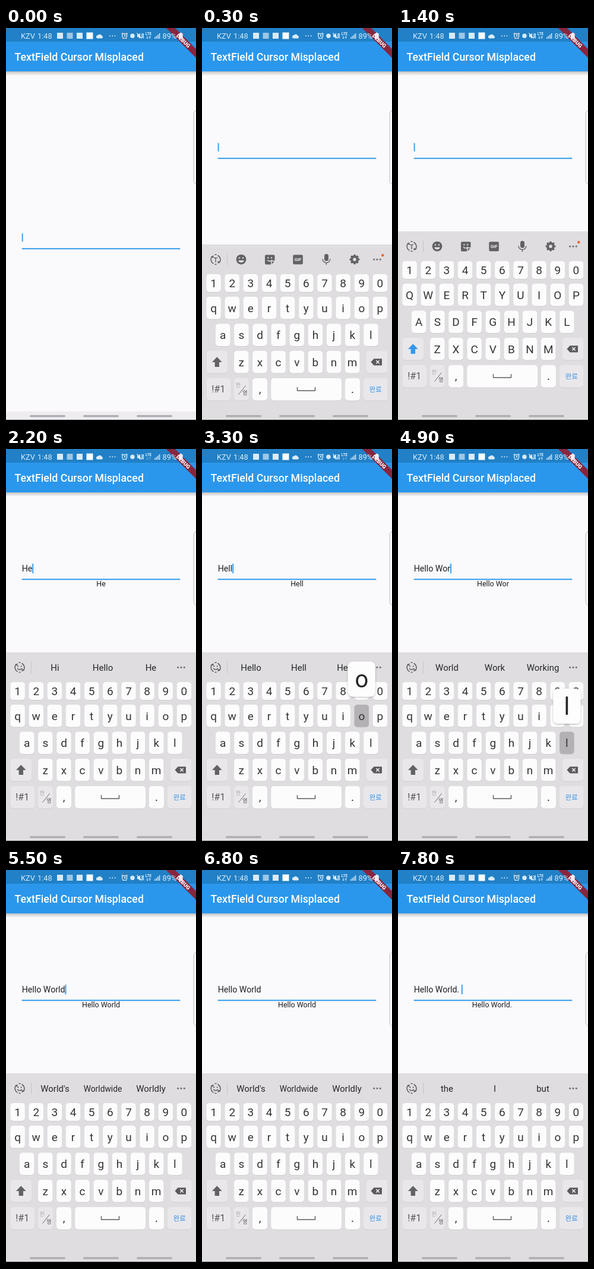
Write an HTML page that moves like this. It is 320 by 661 pixels and loops after 8 s.

```html
<!DOCTYPE html>
<html lang="en">
<head>
<meta charset="utf-8">
<title>TextField cursor</title>
<style>
  html, body { margin: 0; width: 100%; height: 100%; overflow: hidden; background: #faf9fb; }
  svg { display: block; width: 100vw; height: 100vh; font-family: Roboto, sans-serif; }
  text { white-space: pre; }
  .mid { text-anchor: middle; }
  .ko { font-family: "Noto Sans CJK KR", "Noto Sans CJK", sans-serif; }
  .line { fill: none; stroke: #5d5c5f; stroke-width: 1.4; }
  .icon { fill: #626164; }
</style>
</head>
<body>
<svg id="stage" viewBox="0 0 320 661" xmlns="http://www.w3.org/2000/svg"></svg>
<script>
const LOOP = 8000;
const BLUE = '#2b97ec', KEY = '#fdfcfd', SOFT = '#e9e7ea', DOWN = '#b3b1b4', PALE = '#d9ebf8';

const rect = (x, y, w, h, fill, r = 0, more = '') =>
  `<rect x="${x}" y="${y}" width="${w}" height="${h}" rx="${r}" fill="${fill}" ${more}/>`;
const dot = (x, y, r, fill) => `<circle cx="${x}" cy="${y}" r="${r}" fill="${fill}"/>`;
const text = (x, y, size, fill, str, more = '') =>
  `<text x="${x}" y="${y}" font-size="${size}" fill="${fill}" ${more}>${str}</text>`;
const path = (d, more = 'class="line"') => `<path d="${d}" ${more}/>`;
const mid = 'class="mid"';

function appBar() {
  return rect(0, 0, 320, 80, 'url(#shade)') + rect(0, 0, 320, 73, BLUE) + rect(0, 0, 320, 23, '#2180c6') +
    text(14.5, 55, 17.8, '#fff', 'TextField Cursor Misplaced', 'font-weight="500"') +
    `<g transform="translate(320 0) rotate(45)">${rect(-50, 24.9, 100, 10.7, '#87263f')}` +
    text(0, 33.5, 9, '#fff', 'DEBUG', 'class="mid" font-weight="900"') + '</g>';
}

function statusBar() {
  const bars = [0, 1, 2, 3].map(i =>
    rect(250 + i * 2.6, 15.5 - i * 2.2, 1.5, 2.5 + i * 2.2, PALE)).join('');
  const stroke = `fill="none" stroke="${PALE}" stroke-width="1.3"`;
  return text(25, 17.6, 12.8, PALE, 'KZV') + text(53, 17.6, 12.8, PALE, '1:48') +
    rect(86, 8, 10, 10, PALE) + rect(102.5, 8, 10, 10, '#9cc7e6') +
    rect(119, 8, 10, 10, PALE) + rect(135.5, 7.5, 11, 11, '#fafcfd') +
    path('M154.5 17.5a2.7 2.7 0 0 1 .3-5.4a3.8 3.8 0 0 1 6.6 1a2.3 2.3 0 0 1 0 4.4z', `fill="${PALE}"`) +
    [175, 179.3, 183.6].map(x => dot(x, 13.3, 1, PALE)).join('') +
    path('M195.7 13.3a4 4 0 1 0 8 0a4 4 0 1 0-8 0M199.7 10.8v2.7h2M194.6 10.2l2.4-2M204.8 10.2l-2.4-2M196.5 18l1-1.3M203 18l-1-1.3', stroke) +
    dot(213, 13.2, 3.7, PALE) +
    path('M221 11.2h2l3-2.6v9.4l-3-2.7h-2z', `fill="${PALE}"`) +
    path('M220.5 8.5l8 9M228.5 9l1.3 2-1.3 2 1.3 2-1.3 2M231.3 9v8.5', stroke) +
    text(240, 12.4, 6.4, PALE, 'LTE', 'class="mid" font-weight="700"') +
    path('M238 13.6v4.2m-1.4-1.5l1.4 1.6 1.4-1.6M242.3 18.2v-4.2m-1.4 1.5l1.4-1.6 1.4 1.6', `id="data" fill="none" stroke="${PALE}"`) +
    bars + text(263.5, 17.6, 12.8, PALE, '89%') +
    rect(291, 9, 6.8, 9.6, '#f2e9f0', 1) + rect(293, 7.8, 2.8, 1.6, '#f2e9f0');
}

const swirl = path('M19.5 374.3a8 8 0 0 1-2.6-12.2M26.5 360.5a8 8 0 0 1 2.7 12.2') +
  path('M14.8 362.8l4.6-2.3v4.6zM31.2 372l-4.6 2.3v-4.6z', 'class="icon"') + path('M21.5 359.3h3M21.5 375.5h3');

function toolbar() {
  const teeth = [0, 45, 90, 135].map(a =>
    rect(255.2, 359, 3.6, 16.6, '#626164', 1, `transform="rotate(${a} 257 367.3)"`)).join('');
  return swirl + text(23, 371.6, 11.5, '#5d5c5f', 'T', 'class="mid" font-weight="500"') +
    dot(66, 367.3, 8.4, '#626164') + dot(63, 364.8, 1.3, '#dfdde0') + dot(69, 364.8, 1.3, '#dfdde0') +
    path('M61.2 368.7h9.6a4.9 4.7 0 0 1-9.6 0z', 'fill="#dfdde0"') +
    path('M108 359.5h12.5a2 2 0 0 1 2 2v7.5h-4a2.5 2.5 0 0 0-2.5 2.5v4.2h-8a2 2 0 0 1-2-2v-12.2a2 2 0 0 1 2-2zM122 370.5l-4.5 4.7v-3.2a1.5 1.5 0 0 1 1.5-1.5z', 'class="icon"') +
    dot(111.3, 364.5, 1.2, '#dfdde0') + dot(117, 364.5, 1.2, '#dfdde0') +
    path('M110 368.2q4 4 8 0', 'fill="none" stroke="#dfdde0" stroke-width="1.4"') +
    rect(153.3, 359.4, 16.6, 16, '#626164', 2) +
    text(161.6, 370.3, 7.8, '#eeecef', 'GIF', 'class="mid" font-weight="700"') +
    rect(206, 358, 7, 12, '#626164', 3.5) + path('M203 366.5a6.4 6.4 0 0 0 12.8 0M209.4 373v3.3') +
    teeth + dot(257, 367.3, 6.6, '#626164') + dot(257, 367.3, 2.8, '#dfdde0') +
    dot(304.3, 360.3, 2.2, '#f0652f');
}

const suggestBar = () => swirl + dot(20.3, 365.5, 1.1, '#5d5c5f') + dot(25.7, 365.5, 1.1, '#5d5c5f') +
  path('M19 369q4 4 8 0') + [82.5, 163, 244].map(x => text(x, 373.2, 15, '#262628', '', 'class="mid word"')).join('');

function keyboard() {
  const key = (name, x, y, w, h, fill = KEY) => rect(x, y + 1, w, h, '#cfcdd0', 5) +
    rect(x, y, w, h, fill, 5, `data-key="${name}"`);
  const rows = [['1234567890', 19.6, 392, 30], ['qwertyuiop', 19.6, 430, 37.5],
    ['asdfghjkl', 35.2, 475.5, 37.5], ['zxcvbnm', 66.3, 521, 37.5]];
  const letters = rows.map(([chars, x0, y, h]) => [...chars].map((c, i) => {
    const x = x0 + i * 31.15;
    return key(c, x - 12.2, y, 24.4, h) + text(x, y + h / 2 + 6.8, 19, '#343437', c, 'class="mid cap"');
  }).join('')).join('');
  return rect(0, 342, 320, 319, '#dfdde0') +
    `<g id="tools">${toolbar()}</g><g id="suggest">${suggestBar()}</g>` +
    path('M42.5 357.5v20', 'stroke="#c6c4c7"') +
    [289.7, 295, 300.3].map(x => dot(x, 367.3, 1.6, '#777679')).join('') + letters +
    key('shift', 7.5, 521, 35.5, 37.5, SOFT) +
    path('M25.3 531.3l8.4 8.8h-4.7v8h-7.4v-8h-4.7z', 'id="arrow"') +
    key('back', 277, 521, 35.5, 37.5, SOFT) +
    path('M284.5 539.8l5-5.6h13.5v11.2h-13.5z', 'fill="#5a595c"') +
    path('M293.3 537l5.4 5.6m0-5.6l-5.4 5.6', 'stroke="#f3f1f4" stroke-width="1.5"') +
    key('sym', 7.5, 567, 40.5, 37.5, SOFT) + text(27.7, 591.3, 16, '#57565a', '!#1', mid) +
    key('lang', 53.8, 567, 25, 37.5, SOFT) + text(61, 582.2, 9, '#a9a7aa', '한', 'class="mid ko"') +
    path('M61.5 594.5l12-15', 'stroke="#6d6c6f"') + text(72.5, 595.3, 9, '#57565a', '영', 'class="mid ko"') +
    key(',', 85, 567, 25, 37.5) + text(97.5, 591.5, 19, '#343437', ',', mid) +
    key(' ', 116.3, 567, 118.7, 37.5) + path('M160.5 582v6h30v-6', 'class="line" stroke-linejoin="round"') +
    key('.', 241, 567, 25, 37.5) + text(253.5, 591.5, 21, '#343437', '.', mid) +
    key('done', 272, 567, 40.5, 37.5, SOFT) + text(292.3, 590, 11.5, '#3a96e8', '완료', 'class="mid ko"');
}

const stage = document.getElementById('stage');
stage.innerHTML = `<defs>
  <linearGradient id="shade" x1="0" y1="0" x2="0" y2="1">
    <stop offset=".9" stop-color="#000" stop-opacity=".25"/><stop offset="1" stop-color="#000" stop-opacity="0"/>
  </linearGradient>
  <filter id="soft" x="-20%" y="-20%" width="140%" height="140%">
    <feDropShadow dx="0" dy="1" stdDeviation="1.5" flood-opacity=".3"/>
  </filter></defs>` +
  rect(0, 0, 320, 661, '#faf9fb') + appBar() + statusBar() +
  `<g id="field">${rect(26.7, 218.3, 266.6, 1.9, BLUE)}` +
  text(26.7, 205.6, 14.2, '#1e1e20', '', 'id="typed"') +
  text(160, 231.2, 12.45, '#1e1e20', '', 'id="echo" class="mid"') +
  rect(26.7, 193, 1.8, 16, BLUE, 0, 'id="caret"') + '</g>' +
  `<g id="board">${keyboard()}</g>` +
  rect(316.2, 139, 12, 123.5, '#fbfafc', 5, 'stroke="#b9b8bb"') +
  rect(0, 645, 320, 14, '#eeecef', 0, 'id="nav"') +
  [40, 130, 220].map(x => rect(x, 651, 60, 3.4, '#b0aeb1', 1.7)).join('') +
  rect(0, 659, 320, 2, '#050505') +
  `<g id="popup">${rect(-23, 0, 46, 59, '#fefdfe', 8, 'filter="url(#soft)"')}` +
  text(0, 43.5, 40, '#262628', '', 'id="big" class="mid"') + '</g>';

const $ = id => document.getElementById(id);
const set = (el, attrs) => { for (const k in attrs) el.setAttribute(k, attrs[k]); };
const caps = [...stage.querySelectorAll('.cap')];
const words = [...stage.querySelectorAll('.word')];
const keys = {};
for (const el of stage.querySelectorAll('[data-key]')) {
  keys[el.dataset.key] = { el, fill: el.getAttribute('fill') };
}

// Each step changes only the listed parts; a step that types also releases the key.
const press = (at, key) => ({ at, key });
const type = (at, str, rest) => ({ at, str, key: '', typedAt: at, ...rest });
const hint = (at, list) => ({ at, hints: list.split(' ') });
const steps = [
  { at: 0, str: '', key: '', typedAt: 100, caps: false, hints: null, drop: 319, lift: 152 },
  { at: 100, drop: 215 },
  { at: 200, drop: 90, lift: 0 },
  { at: 300, drop: 22 },
  { at: 400, drop: 0 },
  { at: 1400, caps: true },
  press(1700, 'h'), type(1800, 'H', { caps: false }), hint(1900, 'Hi Hey How'),
  press(2100, 'e'), type(2200, 'He'), hint(2200, 'Hi Hello He'),
  press(2700, 'l'), type(2800, 'Hel'), hint(2800, 'Hello Help Hell'),
  press(2900, 'l'), type(3100, 'Hell'), hint(3100, 'Hello Hell Hells'),
  press(3300, 'o'), type(3400, 'Hello'), hint(3500, 'Hello Hellos Hell'),
  press(3600, ' '), type(3800, 'Hello '), hint(3800, 'I To My'),
  press(3900, 'shift'), { at: 4000, key: '', caps: true },
  press(4200, 'w'), type(4300, 'Hello W', { caps: false }), hint(4400, 'We What Will'),
  press(4500, 'o'), type(4600, 'Hello Wo'), hint(4600, 'Would Work World'),
  press(4700, 'r'), type(4800, 'Hello Wor'), hint(4800, 'World Work Working'),
  press(4900, 'l'), type(5000, 'Hello Worl'), hint(5000, 'World Worlds Worldly'),
  press(5100, 'd'), type(5300, 'Hello World'), hint(5500, "World's Worldwide Worldly"),
  press(7100, '.'), type(7300, 'Hello World.'),
  press(7500, ' '), type(7700, 'Hello World. '), hint(7700, 'the I but')
];

function draw(t) {
  const s = Object.assign({}, ...steps.filter(step => step.at <= t));
  const show = (el, on) => el.setAttribute('visibility', on ? 'visible' : 'hidden');

  set($('board'), { transform: `translate(0 ${s.drop})` });
  set($('field'), { transform: `translate(0 ${s.lift})` });
  set($('nav'), { fill: t < 100 ? '#eeecef' : '#dfdde0' });
  set($('data'), { opacity: t >= 2000 && t < 4500 ? 0.4 : 1 });

  $('typed').textContent = $('echo').textContent = s.str;
  const end = s.str ? $('typed').getComputedTextLength() : 0;
  set($('caret'), { x: 26.7 + end, y: s.str ? 192.8 : 193.5, height: s.str ? 16.4 : 14 });
  show($('caret'), t < s.typedAt || (t - s.typedAt) % 1000 < 500);

  caps.forEach(el => {
    el.textContent = s.caps ? el.textContent.toUpperCase() : el.textContent.toLowerCase();
  });
  set($('arrow'), { fill: s.caps ? '#3399ee' : '#626164' });
  show($('tools'), !s.hints);
  show($('suggest'), s.hints);
  words.forEach((el, i) => {
    const word = s.hints ? s.hints[i] : '';
    el.textContent = word;
    set(el, { 'font-size': word.length > 8 ? 13.8 : 15 });
  });

  for (const name in keys) set(keys[name].el, { fill: name === s.key ? DOWN : keys[name].fill });
  const pops = s.key.length === 1 && s.key !== ' ';
  show($('popup'), pops);
  if (pops) {
    const box = keys[s.key].el;
    const x = +box.getAttribute('x') + box.getAttribute('width') / 2;
    set($('popup'), { transform: `translate(${x} ${box.getAttribute('y') - 72.5})` });
    $('big').textContent = s.caps ? s.key.toUpperCase() : s.key;
  }
}

const start = performance.now();
let last = -1;
function tick() {
  const t = Math.floor(((performance.now() - start) % LOOP) / 100) * 100;
  if (t !== last) draw(last = t);
  requestAnimationFrame(tick);
}
tick();
</script>
</body>
</html>
```
